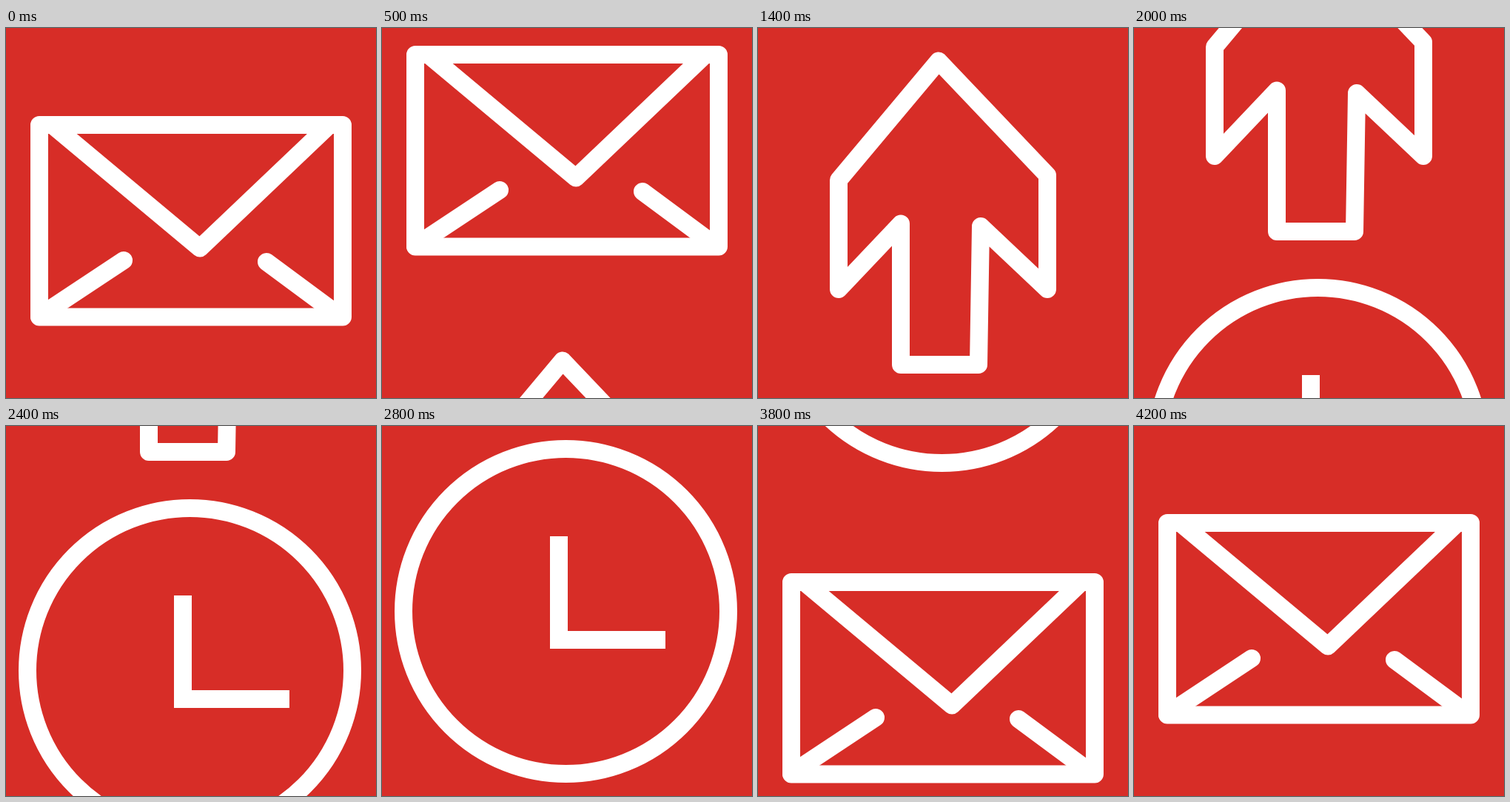
An HTML page with a canvas for the animation above (4.3 s loop, 500 by 500 pixels).

```html
<!DOCTYPE html>
<html lang="en">
<head>
<meta charset="utf-8">
<title>Envelope, arrow, clock</title>
<style>
  html, body { margin: 0; width: 100%; height: 100%; overflow: hidden; background: #d72d27; }
  canvas { display: block; width: 500px; height: 500px; }
</style>
</head>
<body>
<canvas id="stage" width="500" height="500"></canvas>
<script>
const ctx = document.getElementById('stage').getContext('2d');
const SIZE = 500, LOOP = 4300;
const HOLD = 500, SLOT = 1400, STEP = 100, STEPS = 10;

function line(points, closed = false) {
  ctx.beginPath();
  points.forEach(([x, y]) => ctx.lineTo(x, y));
  if (closed) ctx.closePath();
  ctx.stroke();
}

function envelope() {
  line([[45, 131], [455, 131], [455, 390.5], [45, 390.5]], true);
  line([[62.5, 131], [262, 297.5], [437, 131]]);
  line([[45, 389.5], [159, 314]]);
  line([[452, 390], [352, 316]]);
}

function arrow() {
  line([
    [244, 44.5], [391, 199], [391, 353], [301, 268], [298, 455],
    [193, 455], [193, 264.5], [109, 353], [109, 205.5]
  ], true);
}

function clock() {
  ctx.beginPath();
  ctx.arc(248.5, 250.5, 219.5, 0, Math.PI * 2);
  ctx.stroke();
  ctx.lineCap = 'butt';
  ctx.lineJoin = 'miter';
  line([[239, 149], [239, 289], [383, 289]]);
}

const icons = [envelope, arrow, clock];

function drawAt(icon, y) {
  ctx.save();
  ctx.translate(0, y);
  icon();
  ctx.restore();
}

// Each slide advances in ten discrete steps along a quadratic ease-out.
function slideOffset(time) {
  const step = Math.min(STEPS, Math.max(0, Math.floor((time - HOLD) / STEP) + 1));
  const rest = 1 - step / STEPS;
  return SIZE * (1 - rest * rest);
}

function render(time) {
  const slot = Math.min(icons.length - 1, Math.floor(time / SLOT));
  const offset = slideOffset(time - slot * SLOT);
  ctx.fillStyle = '#d72d27';
  ctx.fillRect(0, 0, SIZE, SIZE);
  ctx.strokeStyle = '#fff';
  ctx.lineWidth = 24;
  ctx.lineCap = ctx.lineJoin = 'round';
  drawAt(icons[slot], -offset);
  drawAt(icons[(slot + 1) % icons.length], SIZE - offset);
}

const start = performance.now();
function tick() {
  render((performance.now() - start) % LOOP);
  requestAnimationFrame(tick);
}
tick();
</script>
</body>
</html>
```
